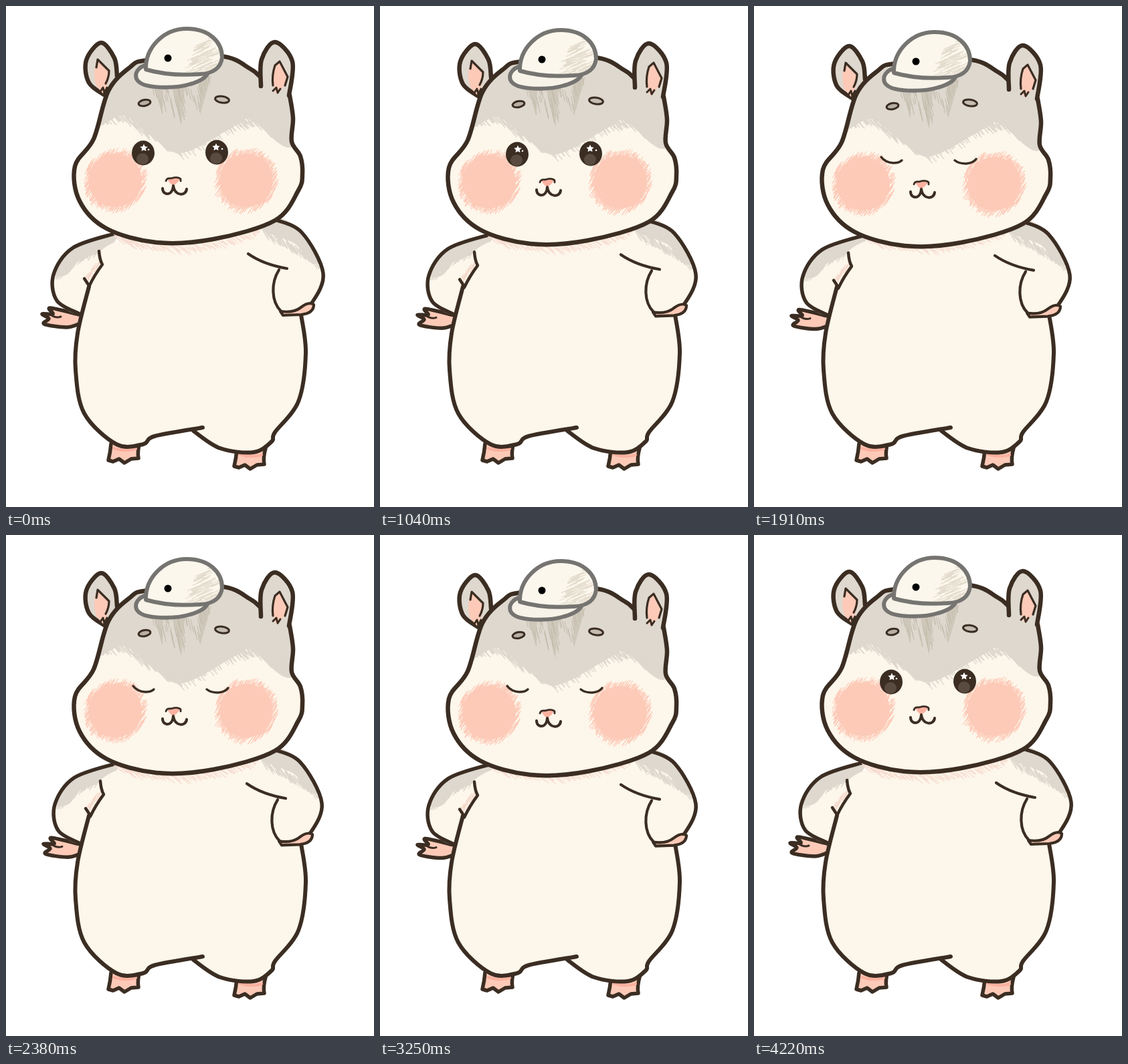
Write an HTML page with a canvas that moves like this. It is 550 by 750 pixels and loops after 4.29 s.

```html
<!DOCTYPE html>
<html lang="en">
<head>
<meta charset="utf-8">
<title>Hamster in a cap</title>
<style>
html, body { margin: 0; width: 100%; height: 100%; overflow: hidden; background: #fff; }
canvas { display: block; }
</style>
</head>
<body>
<canvas id="stage" width="550" height="750"></canvas>
<script>
const ctx = document.getElementById('stage').getContext('2d');
const INK = '#3b2d22', CREAM = '#fdf6ea', GREY = '#ded8cf', PINK = '#fdcab8', ROSE = '#fbb19f';
const CAP_LINE = '#767471';

// One breath sinks from level 0 to 3 and rises again; the later breaths waver at the top
const LOOP = 4290, CALM = 1210, SHUT = 1740, OPEN = 4220;
const calm = breath('0:230 1:170 2:170 3:300 2:170 1:170');
const waver = breath('0:330 1:100 0:100 1:170 2:230 3:70 2:170 1:170');

function breath(s) {
  const steps = s.split(' ').map(p => p.split(':').map(Number));
  const length = steps.reduce((sum, p) => sum + p[1], 0);
  return t => {
    t %= length;
    return steps.find(p => (t -= p[1]) < 0)[0];
  };
}

function levelAt(t) {
  if (t < CALM) return calm(t);
  return t < OPEN ? waver(t - CALM) : 0;
}

const points = s => s.trim().split(/\s+/).map(p => p.split(',').map(Number));

// Smooth path through all points
function curve(s, closed) {
  const p = points(s), n = p.length, path = new Path2D();
  const at = i => closed ? p[(i + n) % n] : p[Math.max(0, Math.min(n - 1, i))];
  path.moveTo(...p[0]);
  for (let i = 0; i < (closed ? n : n - 1); i++) {
    const [a, b, c, d] = [at(i - 1), at(i), at(i + 1), at(i + 2)];
    path.bezierCurveTo(b[0] + (c[0] - a[0]) / 6, b[1] + (c[1] - a[1]) / 6,
      c[0] - (d[0] - b[0]) / 6, c[1] - (d[1] - b[1]) / 6, c[0], c[1]);
  }
  return path;
}

function random(seed) {
  return () => (seed = (seed * 16807) % 2147483647) / 2147483647;
}

// Loose pencil strokes scattered along a polyline
function hatch(s, count, dx, dy, spread) {
  const p = points(s), rnd = random(count * 977), path = new Path2D();
  for (let i = 0; i < count; i++) {
    const u = (i + rnd()) / count * (p.length - 1), k = Math.floor(u), f = u - k;
    const mix = j => p[k][j] * (1 - f) + p[k + 1][j] * f + (rnd() - .5) * spread;
    const x = mix(0), y = mix(1), l = .25 + rnd() * .35;
    path.moveTo(x - dx * l, y - dy * l);
    path.lineTo(x + dx * l, y + dy * l);
  }
  return path;
}

// Slanted strokes that fray the rim of a cheek
function ringHatch(x, y, r) {
  const rnd = random(x), path = new Path2D();
  for (let i = 0; i < 240; i++) {
    const a = i / 240 * Math.PI * 2, d = r + (rnd() - .5) * 9, l = 2 + rnd() * 4;
    const px = x + Math.cos(a) * d, py = y + Math.sin(a) * d;
    path.moveTo(px + l * .7, py - l);
    path.lineTo(px - l * .7, py + l);
  }
  return path;
}

function fill(path, color) {
  ctx.fillStyle = color;
  ctx.fill(path);
}
function line(path, width, color = INK) {
  ctx.lineWidth = width;
  ctx.strokeStyle = color;
  ctx.stroke(path);
}
function shape(path, color, width, ink) {
  fill(path, color);
  line(path, width, ink);
}
function oval(x, y, rx, ry, turn = 0) {
  const path = new Path2D();
  path.ellipse(x, y, rx, ry, turn, 0, Math.PI * 2);
  return path;
}
function star(x, y, r) {
  const path = new Path2D();
  for (let i = 0; i < 10; i++) {
    const a = i * Math.PI / 5 - Math.PI / 2, d = i % 2 ? r * .48 : r;
    path.lineTo(x + Math.cos(a) * d, y + Math.sin(a) * d);
  }
  return path;
}
function shifted(dx, dy, draw) {
  ctx.save();
  ctx.translate(dx, dy);
  draw();
  ctx.restore();
}
function clipped(path, draw) {
  ctx.save();
  ctx.clip(path);
  draw();
  ctx.restore();
}

const SIDE = '124,420 107,490 104,545 117,610 165,656 205,656 222,644 294,631';
const FLANK = '280,636 320,662 370,668 397,652 402,638 437,592 448,520 441,462';
const body = {
  fill: curve(`${SIDE} ${FLANK} 400,330 270,330 150,360`, true),
  side: curve(SIDE),
  flank: curve(FLANK),
  neck: hatch('165,346 200,358 265,364 330,356 385,334', 150, 9, 7, 10)
};
const foot = new Path2D('M157 655 Q156 668 153 680 L160 682 L169 678 L177 684 L187 678 L198 677 Q196 667 200 653');

const LEFT_EDGE = '165,340 100,362 71,402 76,441 110,461';
const leftArm = {
  fill: curve(LEFT_EDGE + ' 132,430 150,375', true),
  edge: curve(LEFT_EDGE),
  shade: curve('165,340 100,362 80,384'),
  hatch: hatch('76,405 105,383 140,364 172,356', 80, -9, 14, 7),
  blush: hatch('122,410 138,387', 22, -6, 9, 8),
  crease: new Path2D('M139 367 Q140 380 144 387 Q132 403 124 420 M117 408 L123 417'),
  hand: curve('109,462 66,452 70,461 54,461 64,468 57,476 90,481 109,476'),
  finger: new Path2D('M66 462 Q75 468 82 465')
};
const RIGHT_EDGE = '400,319 442,339 474,400 456,446 436,459';
const rightArm = {
  fill: curve(RIGHT_EDGE + ' 410,458 399,420 407,394 362,371', true),
  edge: curve(RIGHT_EDGE),
  shade: curve('395,322 442,341 464,368'),
  hatch: hatch('388,339 425,360 468,386', 75, 8, 13, 8),
  crease: new Path2D('M362 371 Q385 387 420 393 M408 395 C396 414 396 442 411 457'),
  hand: new Path2D('M410 457 Q430 460 441 451 Q453 442 460 447 Q460 460 441 462 L414 463 Z')
};

const HEAD = '424,134 429,168 427,203 440,225 443,252 437,276 402,321 310,349 225,354 150,333 110,292 103,240 131,199 153,127 185,92 212,81 320,75 365,94 382,108';
const MASK = '120,178 175,164 215,193 263,220 345,178 368,171 432,208';
const head = {
  fill: curve(HEAD, true),
  line: curve(HEAD),
  mask: curve(MASK + ' 470,60 90,60', true),
  hatch: hatch(MASK, 190, 11, 13, 9),
  stripes: new Path2D('M246 112 L262 180 L268 112Z M221 120 L234 163 L235 118Z M290 112 L290 163 L307 104Z'),
  fur: hatch('221,125 234,155 240,122 251,160 257,122 262,172 270,122 288,150 290,125 306,108', 45, 4, 18, 5),
  leftEar: curve('150,135 124,115 120,81 142,55 162,78 166,105'),
  rightEar: curve('381,120 382,80 402,54 428,83 423,134'),
  leftInner: new Path2D('M136 81 Q128 103 136 121 L145 131 Q155 115 154 97 Z'),
  rightInner: new Path2D('M401 90 L409 83 L421 106 Q417 122 404 132 Q396 118 401 90 Z'),
  folds: new Path2D('M135 92 L137 80 L154 97 Q154 107 149 116 M399 119 Q397 104 402 89 L409 83 L421 106 L417 119'),
  tufts: new Path2D('M141 128 L145 122 L147 130 L151 122 M399 127 L404 122 L406 130 L410 124')
};
const cap = {
  dome: new Path2D('M209 95 C208 62 236 34 270 34 C304 34 323 54 323 77 C321 94 308 101 290 102 C262 104 236 103 209 95Z'),
  brim: new Path2D('M211 88 C197 91 192 101 195 109 C203 126 256 123 275 117 Q297 111 302 100 L240 98Z'),
  shade: hatch('304,50 288,66 315,72 276,82 314,88 272,96', 80, 16, -7, 10)
};
const CHEEKS = [163, 359].map(x => [oval(x, 261, 40, 40), ringHatch(x, 261, 41)]);
const mouth = new Path2D('M234 273 C234 284 249 285 250 269 C252 285 269 285 270 274');
const nose = new Path2D('M241 258 H260 Q258 264 250 269 Q243 265 241 258Z');
const noseLine = new Path2D('M239 262 Q240 257 247 258 Q257 255 261 259 V262');
const lids = new Path2D('M190 226 Q196 234 208 235 Q217 235 221 231 M300 231 Q306 236 317 236 Q328 235 332 229');

function drawFeet() {
  for (const [dx, dy] of [[0, 0], [188, 9]]) {
    shifted(dx, dy, () => {
      shape(foot, PINK, 5.5);
      line(new Path2D('M161 662 Q178 668 194 663'), 4, ROSE);
    });
  }
}

function drawArm(arm, shadeWidth) {
  fill(arm.fill, CREAM);
  clipped(arm.fill, () => {
    line(arm.shade, shadeWidth, GREY);
    line(arm.hatch, 1.2, GREY);
  });
  line(arm.edge, 5.5);
}

function drawLeftArm() {
  shape(leftArm.hand, PINK, 5.5);
  line(leftArm.finger, 3);
  drawArm(leftArm, 42);
}

function drawRightArm() {
  drawArm(rightArm, 36);
  line(rightArm.crease, 4.2);
  shape(rightArm.hand, PINK, 4.2);
}

function drawBody() {
  fill(body.fill, CREAM);
  line(body.neck, 1.2, '#f8ddd2');
  line(body.side, 6);
  line(body.flank, 6);
}

function drawCap() {
  shape(cap.brim, '#f8f3e8', 6, CAP_LINE);
  fill(cap.dome, '#fcf7ed');
  clipped(cap.dome, () => line(cap.shade, 1.2, '#e4dccd'));
  line(cap.dome, 6, CAP_LINE);
  fill(oval(242, 78, 5.5, 5.5), '#000');
}

function drawEye(x, y, turn) {
  fill(oval(x, y, 17, 18.5), INK);
  fill(oval(x - 1, y + 9, 9, 8.5), '#5a4b41');
  fill(star(x + turn, y - 7.5, 6), '#fff');
  fill(oval(x + 8, y - 5, 1.3, 1.3), '#fff');
}

function drawHead() {
  shape(head.leftEar, GREY, 6.5);
  fill(head.leftInner, PINK);
  fill(head.fill, CREAM);
  clipped(head.fill, () => {
    fill(head.mask, GREY);
    line(head.hatch, 1.4, GREY);
    fill(head.stripes, '#cfc8ba');
    line(head.fur, 1, '#c3bbab');
  });
  line(head.line, 6.5);
  shape(head.rightEar, GREY, 6.5);
  fill(head.rightInner, PINK);
  line(head.folds, 3.2);
  line(head.tufts, 3);
  for (const [core, rim] of CHEEKS) {
    fill(core, PINK);
    line(rim, 1.1, PINK);
  }
  shape(oval(207, 145, 9, 4.5, -.2), '#b7afa3', 3);
  shape(oval(323, 140, 10.5, 4.8, .15), '#c5bdb1', 3);
  fill(nose, ROSE);
  line(noseLine, 2.8);
  line(mouth, 4);
  drawCap();
}

function draw(level, shut) {
  const headY = Math.round(level * 2.4), armY = level * 1.3;
  const squeeze = level % 3 ? 2 : 0;
  const leftX = squeeze || -level * .7;
  ctx.fillStyle = '#fff';
  ctx.fillRect(0, 0, 550, 750);
  ctx.lineCap = ctx.lineJoin = 'round';
  shifted(0, level === 3 ? -2 : 0, drawFeet);
  shifted(leftX, armY, drawLeftArm);
  drawBody();
  shifted(leftX, armY, () => {
    line(leftArm.blush, 1.3, '#f6d9cc');
    line(leftArm.crease, 4.5);
  });
  shifted(-squeeze, armY, drawRightArm);
  shifted(0, headY, () => {
    drawHead();
    if (shut) return;
    drawEye(205, 220, 1);
    drawEye(315, 219, -1);
  });
  if (shut) line(lids, 3.4);
}

let shown = '';
function tick() {
  const t = performance.now() % LOOP;
  const level = levelAt(t), shut = t >= SHUT && t < OPEN, key = level + ' ' + shut;
  if (key !== shown) {
    draw(level, shut);
    shown = key;
  }
  requestAnimationFrame(tick);
}
tick();
</script>
</body>
</html>
```
